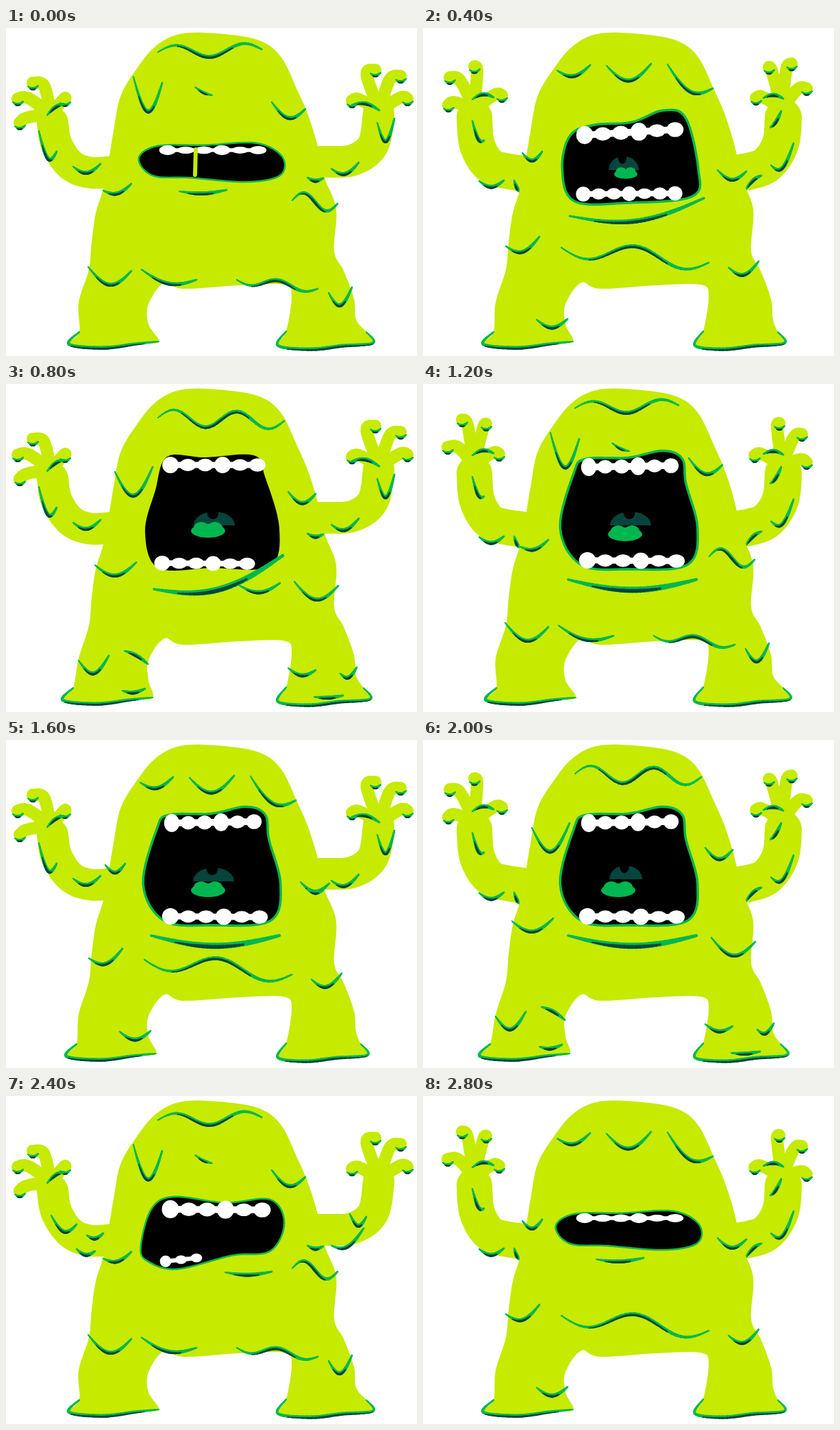
Write an HTML page with a canvas that moves like this. It is 600 px wide and 478 px high and loops after 3 s.

```html
<!DOCTYPE html>
<html lang="en">
<head>
<meta charset="utf-8">
<title>Slime monster</title>
<style>
  html, body { margin: 0; width: 100%; height: 100%; overflow: hidden; background: #fff; }
  canvas { display: block; }
</style>
</head>
<body>
<canvas id="stage" width="600" height="478"></canvas>
<script>
const ctx = document.getElementById('stage').getContext('2d');
const SLIME = '#c6ea00', GREEN = '#00b74f', DARK = '#06443c';
const STEP = 200, STEPS = 15;
const { PI, sin, floor } = Math;

const points = text => text.split(' ').map(p => p.split(',').map(Number));
const lerp = (a, b, t) => a + (b - a) * t;

// Catmull-Rom samples through the given points.
function spline(pts, closed) {
  const n = pts.length, out = [];
  const at = i => closed ? pts[(i + n) % n] : pts[Math.max(0, Math.min(n - 1, i))];
  for (let i = 0; i < (closed ? n : n - 1); i++) {
    const [a, b, c, d] = [at(i - 1), at(i), at(i + 1), at(i + 2)];
    for (let t = 0; t < 1; t += 0.125) {
      out.push([0, 1].map(k => b[k] + t / 2 * (c[k] - a[k]
        + t * (2 * a[k] - 5 * b[k] + 4 * c[k] - d[k] + t * (3 * (b[k] - c[k]) + d[k] - a[k])))));
    }
  }
  return closed ? out : [...out, at(n - 1)];
}

function trace(samples) {
  ctx.beginPath();
  samples.forEach(([x, y]) => ctx.lineTo(x, y));
}

function blob(pts, color, rim = 0) {
  trace(spline(pts, true));
  ctx.closePath();
  ctx.strokeStyle = GREEN;
  ctx.lineWidth = rim;
  if (rim) ctx.stroke();
  ctx.fillStyle = color;
  ctx.fill();
}

function limb(pts, width, color = SLIME) {
  trace(spline(pts));
  ctx.strokeStyle = color;
  ctx.lineWidth = width;
  ctx.stroke();
}

function ellipse(x, y, rx, ry, color, from = 0) {
  ctx.beginPath();
  ctx.ellipse(x, y, rx, ry, 0, from, 2 * PI);
  ctx.fillStyle = color;
  ctx.fill();
}

// A green line that swells in the middle, with a dark shadow on its underside.
function brush(samples, width) {
  const stroke = (part, color, thick, dy) => part.slice(1).forEach(([x, y], i) => {
    trace([[part[i][0], part[i][1] + dy], [x, y + dy]]);
    ctx.strokeStyle = color;
    ctx.lineWidth = thick * (0.4 + 0.6 * sin(PI * i / part.length));
    ctx.stroke();
  });
  const n = samples.length;
  stroke(samples, GREEN, width, 0);
  stroke(samples.slice(n * 0.2, n * 0.75), DARK, width * 0.6, 1.4);
}

// A line between two points that sags in one or more half waves.
function drip(x0, y0, x1, y1, sag, waves = 1, width = 5.5) {
  brush(Array.from({ length: 33 }, (_, i) => {
    const t = i / 32;
    return [lerp(x0, x1, t), lerp(y0, y1, t) + sag * sin(PI * waves * t)];
  }), width);
}

// Fingers arch from the palm to each tip; hook moves the knuckle sideways.
function hand(px, py, ...tips) {
  for (const [x, y, hook] of tips) {
    limb([[px, py], [lerp(px, x, 0.75) + hook, lerp(py, y, 0.8) - 5], [x, y]], 18);
  }
  for (const [x, y] of tips) drip(x - 7, y + 5, x + 8, y + 4, 4, 1, 4);
}

function lowArms(alternate) {
  limb(points('165,208 125,211 95,200 74,170 68,138'), 46);
  limb(points('430,194 470,195 508,192 536,170 544,125'), 46);
  hand(65, 125, [39, 80, 10], [17, 103, 4], [20, 138, 0], [86, 104, 4]);
  hand(545, 120, [539, 61, -14], [576, 70, -8], [586, 103, 0], [505, 106, 0]);
  drip(60, 127, 85, 111, -4);
  if (alternate) {
    drip(66, 174, 103, 187, 17);
    drip(118, 203, 142, 200, 6);
    drip(103, 223, 130, 226, 7);
    drip(502, 172, 526, 176, 15);
    drip(475, 218, 522, 193, 14);
  } else {
    drip(48, 150, 74, 180, 25);
    drip(98, 202, 138, 198, 11);
    drip(505, 112, 545, 120, -6);
    drip(542, 138, 567, 132, 30);
    drip(475, 205, 515, 196, 12);
  }
}

function raisedArms(alternate, curled) {
  limb(points('165,214 125,209 97,200 79,170 75,130'), 52);
  limb(points('435,214 475,209 503,198 522,168 526,130'), 54);
  if (curled) {
    hand(74, 118, [57, 52, 4], [92, 58, 0], [36, 92, 6], [111, 102, 0]);
    hand(524, 118, [520, 57, -4], [553, 73, -4], [560, 114, 0], [484, 104, 0]);
  } else {
    hand(75, 118, [39, 72, 6], [75, 56, 4], [37, 112, 0], [115, 98, 0]);
    hand(524, 118, [505, 57, 0], [538, 52, -4], [560, 88, -4], [486, 102, 0]);
  }
  drip(72, 104, 103, 101, -6);
  drip(497, 102, 526, 103, -5);
  drip(133, 222, 140, 238, 2);
  if (alternate) {
    drip(64, 158, 90, 176, 16);
    drip(96, 212, 122, 211, 8);
    drip(508, 172, 533, 166, 14);
  } else {
    drip(72, 135, 89, 164, 12);
    drip(82, 223, 118, 222, 9);
    drip(508, 200, 541, 168, 20);
    drip(507, 145, 523, 121, 4);
    drip(470, 237, 494, 215, -4);
  }
}

// The feet slide a little from pose to pose; each foot has a slimy rim.
function body(leftFoot, rightFoot) {
  const left = [[leftFoot + 131, 457], [leftFoot + 100, 460], [leftFoot + 50, 466], [leftFoot, 461], [leftFoot + 15, 443]];
  const right = [[rightFoot - 10, 443], [rightFoot, 459], [rightFoot - 45, 463], [rightFoot - 90, 468], [397, 463], [409, 442]];
  blob([
    ...points('157,150 167,100 189,62 219,26 258,8 320,9 372,19 402,43 425,90 441,127 455,172 465,218 482,264 479,325 493,354 508,395 511,425'),
    ...right, ...points('417,390 405,374 340,375 258,380 231,371 208,402 208,432'),
    ...left, ...points('106,400 121,352 125,312 131,270 142,234 150,192')
  ], SLIME);
  brush(spline(left), 5);
  brush(spline(right), 5);
}

const bodies = [
  () => {
    body(92, 536);
    drip(222, 35, 373, 31, -9, 3);
    drip(186, 71, 228, 80, 46);
    drip(276, 86, 301, 98, 2, 1, 4);
    drip(388, 108, 437, 118, 18);
    drip(142, 237, 183, 227, 9);
    drip(418, 251, 484, 256, -12, 2);
    drip(120, 348, 183, 354, 23);
    drip(198, 352, 278, 367, 13);
    drip(337, 367, 455, 380, 6, 3);
    drip(471, 386, 505, 378, 22);
  },
  () => {
    body(83, 532);
    drip(222, 49, 406, 54, -12, 4);
    drip(159, 128, 214, 121, 38);
    drip(412, 157, 452, 160, 15);
    drip(130, 264, 190, 260, 17);
    drip(421, 288, 485, 294, 23);
    drip(106, 403, 150, 396, 22);
    drip(173, 389, 207, 408, -3);
    drip(412, 414, 452, 417, 9);
    drip(488, 422, 512, 413, 10);
    drip(170, 447, 203, 444, 4);
    drip(450, 456, 492, 454, 2);
  },
  () => {
    body(88, 528);
    drip(196, 62, 244, 54, 12);
    drip(268, 55, 333, 52, 23);
    drip(357, 53, 423, 88, 22);
    drip(145, 182, 174, 180, 12);
    drip(430, 207, 472, 209, 13);
    drip(121, 318, 170, 304, 15);
    drip(202, 320, 417, 342, 13, 3);
    drip(446, 349, 490, 340, 15);
    drip(166, 425, 211, 424, 12);
  }
];

// A row of teeth of uneven height on a common gum.
function teeth(x0, y0, x1, y1, count, size) {
  limb([[x0, y0], [x1, y1]], size * 0.9, '#fff');
  for (let i = 0; i < count; i++) {
    const t = i / (count - 1);
    ellipse(lerp(x0, x1, t), lerp(y0, y1, t), (x1 - x0) / count * 0.56, size * (1 + 0.2 * sin(2.2 * i + 1.5)), '#fff');
  }
}

function throat(x, y, uvulaWidth, tongueX, tongueY, tongueWidth) {
  ellipse(x, y, uvulaWidth, 20, DARK, PI);
  ellipse(x - 2, y - 18, uvulaWidth * 0.28, 9, '#000');
  ellipse(tongueX, tongueY + 2, tongueWidth, tongueWidth * 0.4, GREEN);
  for (const side of [-0.4, 0.4]) {
    ellipse(tongueX + side * tongueWidth, tongueY - 2, tongueWidth * 0.45, tongueWidth * 0.36, GREEN);
  }
}

function closedMouth() {
  blob(points('195,190 222,173 290,172 365,169 402,188 399,214 350,223 270,217 215,214'), '#000', 5);
  teeth(236, 178, 368, 178, 6, 6);
  drip(253, 238, 322, 236, 4);
}

function tallMouth() {
  blob(points('202,210 222,130 238,111 300,109 350,99 377,110 382,145 399,210 385,262 300,268 232,262'), '#000', 7);
  teeth(242, 121, 362, 119, 6, 11);
  teeth(240, 257, 370, 258, 6, 10);
  drip(212, 285, 399, 285, 15, 1, 9);
}

const mouths = {
  closed: closedMouth,
  split() {
    closedMouth();
    limb([[277, 177], [276, 214]], 6);
  },
  half() {
    blob(points('198,220 213,166 245,148 320,157 385,152 405,185 385,225 330,231 250,251 208,240'), '#000', 5);
    teeth(240, 165, 374, 166, 6, 11);
    teeth(233, 241, 278, 236, 3, 7);
    drip(320, 257, 388, 256, 4);
  },
  wide() {
    blob(points('205,205 216,158 250,143 305,139 350,122 382,132 400,205 392,244 300,253 222,251'), '#000', 7);
    teeth(236, 156, 368, 148, 6, 11);
    teeth(234, 242, 368, 241, 7, 9);
    throat(293, 207, 22, 296, 211, 17);
    drip(214, 274, 410, 248, 20, 1, 7);
  },
  tall() {
    tallMouth();
    throat(303, 206, 30, 295, 217, 25);
  },
  gulp() {
    tallMouth();
    throat(296, 203, 24, 285, 217, 25);
  },
  roar() {
    blob(points('203,215 218,155 235,106 290,107 362,104 378,135 399,210 385,266 300,268 222,268'), '#000');
    teeth(240, 118, 367, 118, 6, 10);
    teeth(228, 261, 352, 262, 6, 9);
    throat(304, 206, 30, 295, 212, 25);
    drip(216, 299, 404, 250, 25, 1, 9);
    drip(340, 293, 400, 290, 12);
  }
};

const speech = 'split half wide tall roar roar tall roar tall roar gulp wide half closed closed'.split(' ');
const alternateArms = '010101010101100';

function draw(step) {
  ctx.fillStyle = '#fff';
  ctx.fillRect(0, 0, 600, 478);
  const raised = floor(step / 2) % 2, curled = floor(step / 4) % 2;
  (raised ? raisedArms : lowArms)(+alternateArms[step], curled);
  bodies[step % 3]();
  if (!raised) drip(440, 218, 463, 219, 4);
  mouths[speech[step]]();
}

ctx.lineCap = ctx.lineJoin = 'round';
const start = performance.now();
let shown = -1;
function tick() {
  const step = floor((performance.now() - start) / STEP) % STEPS;
  if (step !== shown) draw(shown = step);
  requestAnimationFrame(tick);
}
tick();
</script>
</body>
</html>
```
